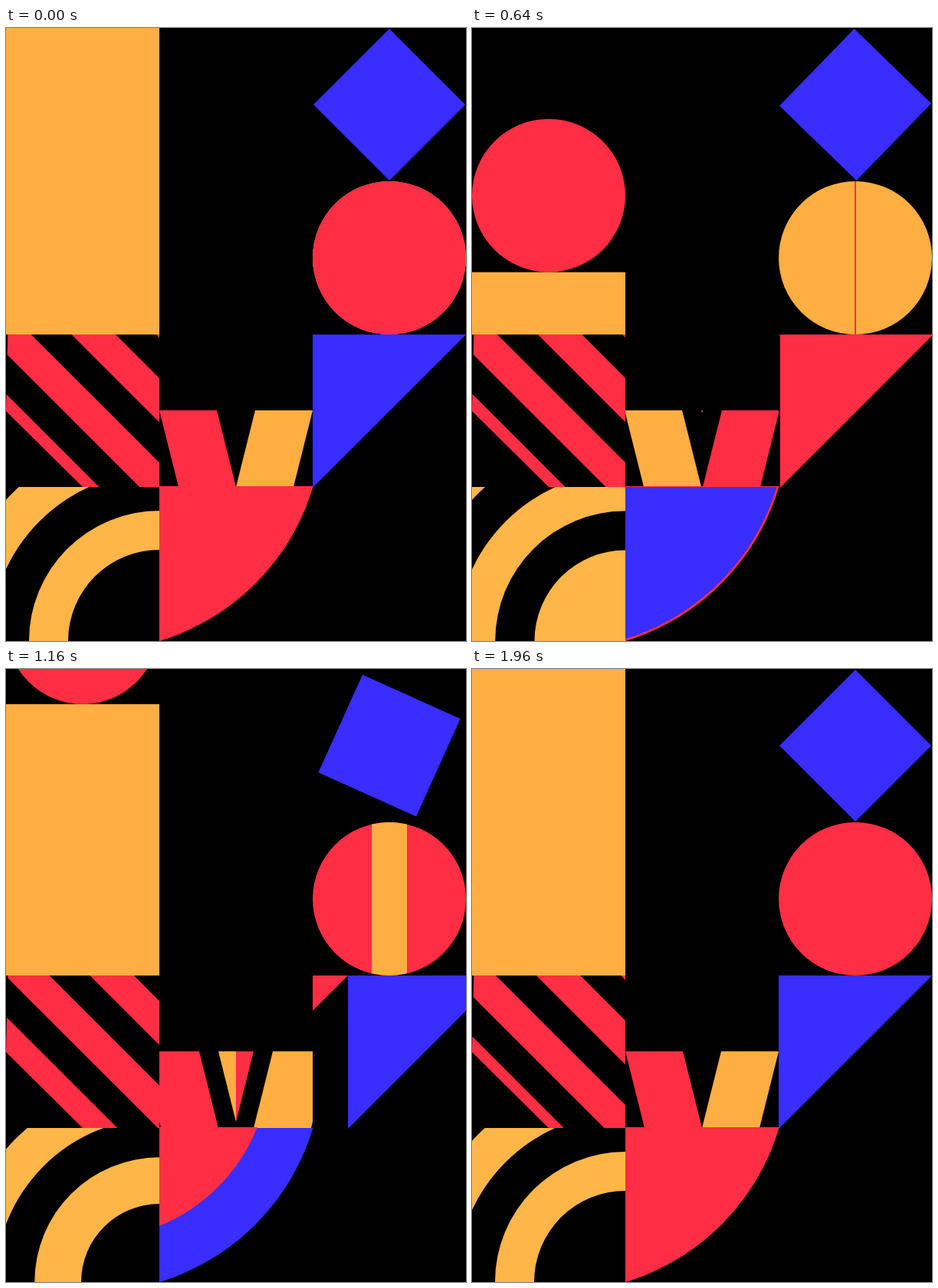
Recreate the animation shown at these times as an HTML page with a canvas. Size 600x800 px, loop 2000 ms.

```html
<!DOCTYPE html>
<html lang="en">
<head>
<meta charset="utf-8">
<title>Geometric tiles</title>
<style>
  html, body { margin: 0; width: 100%; height: 100%; overflow: hidden; background: #000; }
  canvas { display: block; width: 600px; height: 800px; }
</style>
</head>
<body>
<canvas id="stage" width="600" height="800"></canvas>
<script>
const ctx = document.getElementById('stage').getContext('2d');
const RED = '#ff2e44', ORANGE = '#ffae42', AMBER = '#ffb648', BLUE = '#392dff';
const LOOP = 2000, HALF = 1000, STEP = 40;

// Remaining distance (1 to 0) under cubic-bezier(0, 1, x2, 1).
function remaining(x, x2) {
  let lo = 0, hi = 1;
  for (let i = 0; i < 40; i++) {
    const s = (lo + hi) / 2;
    if (3 * (1 - s) * s * s * x2 + s * s * s < x) lo = s; else hi = s;
  }
  return (1 - lo) ** 3;
}

function rect(color, x, y, w, h) {
  ctx.fillStyle = color;
  ctx.fillRect(x, y, w, h);
}

function disc(color, x, y, r) {
  ctx.fillStyle = color;
  ctx.beginPath();
  ctx.arc(x, y, r, 0, Math.PI * 2);
  ctx.fill();
}

function trace(points) {
  ctx.beginPath();
  points.forEach(([x, y]) => ctx.lineTo(x, y));
  ctx.closePath();
}

function poly(color, points) {
  ctx.fillStyle = color;
  trace(points);
  ctx.fill();
}

function clipped(points, draw) {
  ctx.save();
  trace(points);
  ctx.clip();
  draw();
  ctx.restore();
}

const box = (x, y, w, h) => [[x, y], [x + w, y], [x + w, y + h], [x, y + h]];

function column(odd, fast) {
  const top = 320 * (odd ? fast : 1 - fast);
  disc(RED, 100, top - 100, 100);
  rect(ORANGE, 0, top, 200, 400 - top);
}

function square(rem) {
  ctx.save();
  ctx.translate(500, 100);
  ctx.rotate((45 - 90 * rem) * Math.PI / 180);
  rect(BLUE, -70, -70, 140, 140);
  ctx.restore();
}

function ball(odd, rem) {
  disc(odd ? RED : ORANGE, 500, 300, 100);
  clipped(box(500 - 100 * rem, 200, 200 * rem, 200),
    () => disc(odd ? ORANGE : RED, 500, 300, 100));
}

function stripes(odd, rem) {
  const edge = (odd ? 31 : 32) + 111 * rem;
  clipped([[2.3, 400], [200, 400], [200, 599], [100, 599], [0, 500]], () => {
    for (let k = -3; k <= 2; k++) {
      const u = edge + 110.3 * k, l = u - 57.5;
      poly(RED, [[l, 400], [u, 400], [u + 200, 600], [l + 200, 600]]);
    }
  });
}

// One half of the V; side is -1 for left and 1 for right.
function slash(side, from, to, rem) {
  const at = d => 300 + side * d;
  const bar = (color, d) => poly(color,
    [[at(25 + d), 499], [at(100 + d), 499], [at(75 + d), 599], [at(d), 599]]);
  clipped(box(side < 0 ? 200 : 300, 499, 100, 100), () => {
    bar(from, 100 * rem - 100);
    bar(to, 100 * rem);
  });
}

function triangles(odd, rem) {
  const tri = (color, x) => poly(color, [[x, 400], [x + 200, 400], [x, 600]]);
  clipped(box(400, 400, 200, 200), () => {
    tri(odd ? RED : BLUE, 200 + 200 * rem);
    tri(odd ? BLUE : RED, 400 + 200 * rem);
  });
}

function rings(odd, fast) {
  const edges = [323, 272, 221, 170, 119];
  clipped(box(0, 599, 200, 201), () => {
    edges.forEach((r, i) => {
      const lit = (i % 2 === 0) !== odd;
      disc(lit ? AMBER : '#000', 200, 800, r - (i === 4 ? 119 : 51) * fast);
    });
  });
}

function fan(odd, rem) {
  const grow = (color, k) => {
    const top = color === RED ? 598 : 599;
    clipped(box(200, top, 400, 800 - top), () => disc(color, 113, 513, 300 * k));
  };
  grow(odd ? BLUE : RED, 1);
  grow(odd ? RED : BLUE, 1 - rem);
}

function draw(ms) {
  const t = Math.floor((ms % LOOP) / STEP) * STEP;
  const odd = t >= HALF;
  const x = (t % HALF) / HALF;
  const rem = remaining(x, 0.37), fast = remaining(x, 0.145);
  const [old, next] = odd ? [ORANGE, RED] : [RED, ORANGE];

  rect('#000', 0, 0, 600, 800);
  column(odd, fast);
  square(rem);
  ball(odd, rem);
  stripes(odd, rem);
  slash(-1, old, next, rem);
  slash(1, next, old, rem);
  triangles(odd, rem);
  rings(odd, fast);
  fan(odd, rem);
}

const start = performance.now();
function tick() {
  draw(performance.now() - start);
  requestAnimationFrame(tick);
}
tick();
</script>
</body>
</html>
```
